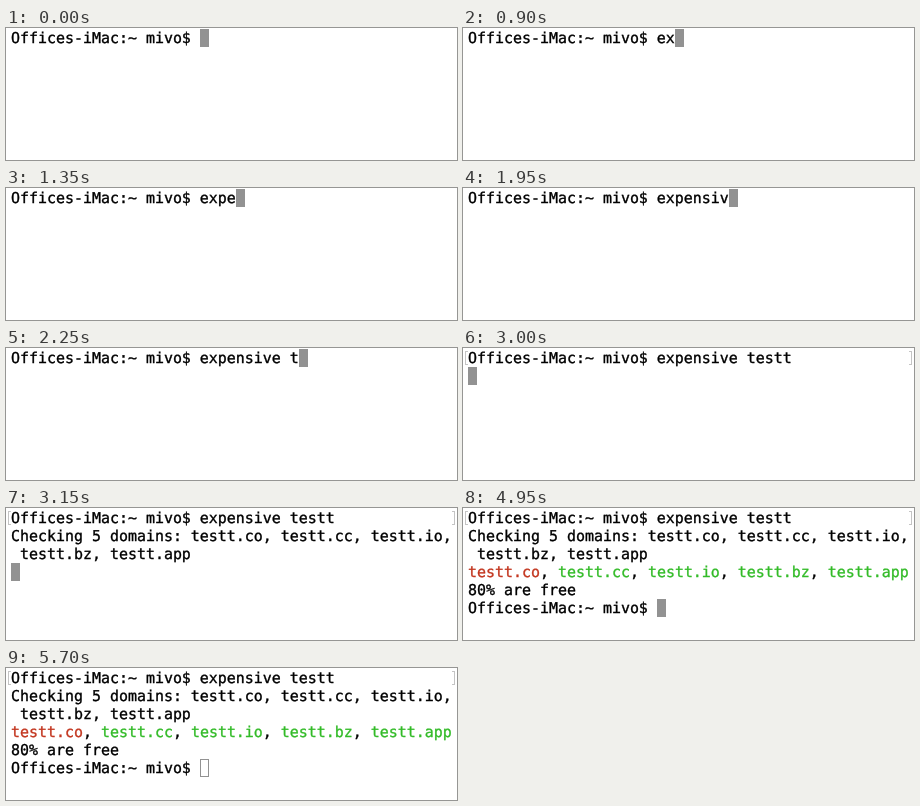
An HTML page for the animation above (6.45 s loop, 451 by 132 pixels).

```html
<!DOCTYPE html>
<html lang="en">
<head>
<meta charset="utf-8">
<title>Terminal</title>
<style>
  html, body { margin: 0; width: 100%; height: 100%; overflow: hidden; background: #fff; }
  #stage { position: relative; width: 451px; height: 132px; overflow: hidden; background: #fff; }
  pre {
    position: absolute; left: 5px; top: 1px; margin: 0;
    font: 14.95px/18px "DejaVu Sans Mono", monospace;
    font-variant-ligatures: none; text-rendering: geometricPrecision;
    -webkit-text-stroke: 0.35px currentColor;
    color: #000;
  }
  .taken { color: #c33720; }
  .free { color: #33bb28; }
  #cursor {
    position: absolute; box-sizing: border-box; width: 9px; height: 18px;
    border: 1px solid #929292; background: #929292;
  }
  #cursor.hollow { background: #fff; }
  .mark {
    position: absolute; box-sizing: border-box; top: 3px; width: 3px; height: 14px;
    border: 1px solid #c4c4c4;
  }
  #left { left: 2px; border-right: 0; }
  #right { left: 446px; border-left: 0; }
</style>
</head>
<body>
<div id="stage">
  <div id="cursor"></div>
  <div class="mark" id="left"></div>
  <div class="mark" id="right"></div>
  <pre id="screen"></pre>
</div>
<script>
const LOOP = 6450, CELL = 9, LINE = 18;
const PROMPT = 'Offices-iMac:~ mivo$ ';
const COMMAND = 'expensive testt';
const ENTER = 3000, CHECK = 3150, RESULT = 4950, BLUR = 5700;

// [time in ms, characters typed]
const KEYS = [
  [0, 0], [600, 1], [900, 2], [1200, 3], [1350, 4], [1650, 5], [1800, 6],
  [1950, 8], [2100, 9], [2250, 11], [2400, 12], [2700, 14], [2850, 15]
];

const byId = id => document.getElementById(id);
const output = byId('screen'), cursor = byId('cursor');
const marks = document.querySelectorAll('.mark');

const domains = ['co', 'cc', 'io', 'bz', 'app'].map(tld => 'testt.' + tld);
const checking = 'Checking 5 domains: ' + domains.slice(0, 3).join(', ') + ',\n ' +
  domains.slice(3).join(', ');
const results = domains
  .map((name, i) => `<span class="${i ? 'free' : 'taken'}">${name}</span>`)
  .join(', ');

function stateAt(t) {
  const typed = KEYS.filter(([at]) => at <= t).pop()[1];
  const lines = [PROMPT + COMMAND.slice(0, typed)];
  let col = PROMPT.length + typed, row = 0;
  if (t >= ENTER) { col = 0; row = 1; }
  if (t >= CHECK) { lines.push(checking); row = 3; }
  if (t >= RESULT) {
    lines.push(results, '80% are free', PROMPT);
    col = PROMPT.length;
    row = 5;
  }
  return { html: lines.join('\n'), col, row };
}

let shown = '';
function render(t) {
  const { html, col, row } = stateAt(t);
  if (html !== shown) output.innerHTML = shown = html;
  cursor.style.left = 5 + col * CELL + 'px';
  cursor.style.top = 1 + row * LINE + 'px';
  cursor.classList.toggle('hollow', t >= BLUR);
  marks.forEach(m => m.style.visibility = t >= ENTER ? 'visible' : 'hidden');
}

const start = performance.now();
function tick() {
  render((performance.now() - start) % LOOP);
  requestAnimationFrame(tick);
}
tick();
</script>
</body>
</html>
```
